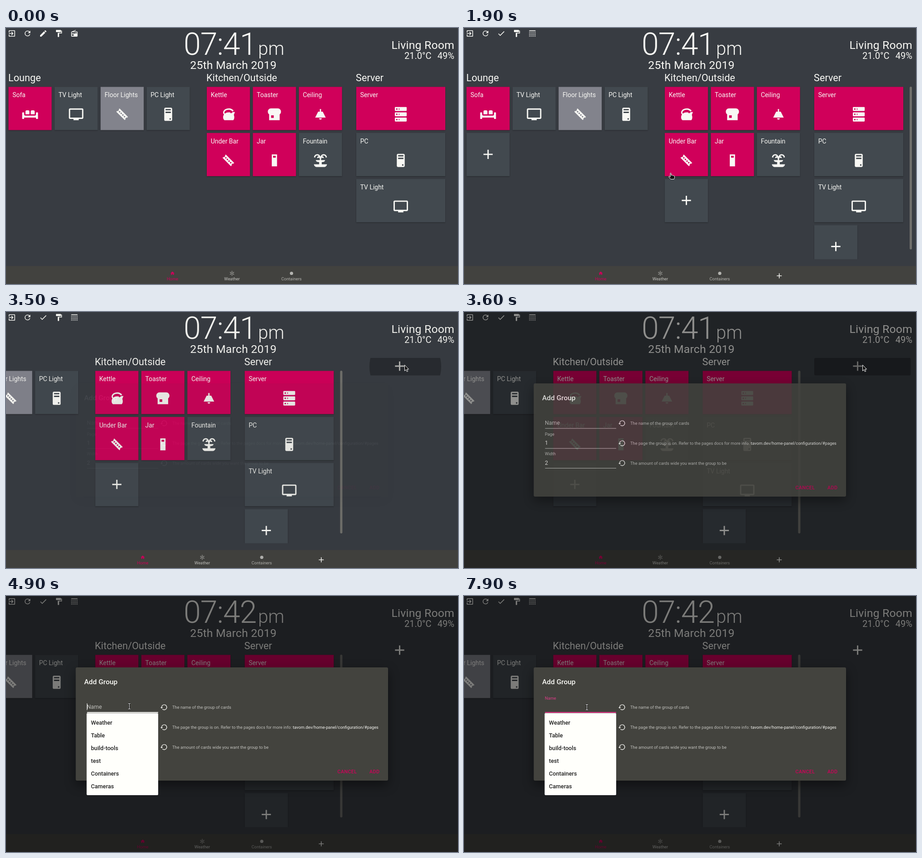
An HTML page that plays this animation: 995 px wide and 563 px high, repeating every 8000 ms.

```html
<!DOCTYPE html>
<html lang="en">
<head>
<meta charset="utf-8">
<title>Home panel</title>
<style>
  html, body { margin: 0; width: 100%; height: 100%; overflow: hidden; background: #383c42; }
  svg { display: block; width: 995px; height: 563px; font-family: Roboto, sans-serif; }
  text { white-space: pre; }
  .ui { fill: #f8f8f4; }
  .card { filter: drop-shadow(0 1px 1px rgba(0, 0, 0, .35)); }
  .plus { fill: none; stroke: #f8f8f4; stroke-width: 2; }
  .head { font-size: 21.7px; }
  .name { font-size: 13.95px; }
  .big { font-size: 24.8px; letter-spacing: .18px; }
  .tab { font-size: 9.3px; text-anchor: middle; }
  .help { font-size: 9.3px; fill: #c0c0bc; }
  .value { font-size: 12.4px; fill: #f0f0ec; }
  .button { font-size: 10.85px; font-weight: 500; letter-spacing: .3px; fill: #d0005a; }
  .option { font-size: 12.65px; font-weight: 500; fill: #222; }
  .pointer { fill: #111; stroke: #fff; stroke-width: 1; stroke-linejoin: round; }
</style>
</head>
<body>
<svg id="stage" viewBox="0 0 995 563"></svg>
<script>
const PINK = '#d0005a', SLATE = '#42494f', GREY = '#82838c';

const path = d => `<path fill-rule="evenodd" d="${d}"/>`;
const rows = f => [0, 8, 16].map(f).join('');
const PLUS = '<path class="plus" d="M12 5v14M5 12h14"/>';

const icons = {
  sofa: path('M7 6h2a2 2 0 0 1 2 2v4H5V8a2 2 0 0 1 2-2M15 6h2a2 2 0 0 1 2 2v4h-6V8a2 2 0 0 1 2-2M1 9h1a1 1 0 0 1 1 1v2a2 2 0 0 0 2 2h14a2 2 0 0 0 2-2v-2a1 1 0 0 1 1-1h1a1 1 0 0 1 1 1v9h-3v-2H3v2H0v-9a1 1 0 0 1 1-1z'),
  tv: path('M21 17H3V5h18zM21 3H3a2 2 0 0 0-2 2v12a2 2 0 0 0 2 2h5v2h8v-2h5a2 2 0 0 0 2-2V5a2 2 0 0 0-2-2z'),
  strip: `<g transform="rotate(45 12 12)">${path('M3 8.5h18v2h-1v3h1v2H3v-2h1v-3H3z' + [5.5, 9, 12.5, 16].map(x => `M${x} 11h2v2h-2z`).join(''))}</g>`,
  tower: path('M8 2h8a2 2 0 0 1 2 2v16a2 2 0 0 1-2 2H8a2 2 0 0 1-2-2V4a2 2 0 0 1 2-2M8 4v2h8V4zM8 8v2h8V8zM14 18v2h2v-2z'),
  kettle: path('M4 9.5C4 5.5 8 3 12.5 3c3.5 0 6.3 1.4 7.5 3.5L18.2 8c-1-1.8-3.2-3-5.7-3C9 5 6 7 6 9.5c0 .5.2 1 .6 1.5C8 9.7 10 9 12 9h2.5l1.5 1.5 3-2h3l-1.7 4.3c.5 1.2.7 2.4.7 3.7 0 2-.5 3.500-1.5 4.500H6c-1.300-1-2-2.700-2-4.500 0-1.600.5-3 1.400-4.200C4.500 11.400 4 10.400 4 9.500z'),
  toaster: path('M7 3h10c3 0 5 2.500 5 5 0 2-1 3.500-2 4v9H4v-9c-1-.5-2-2-2-4 0-2.500 2-5 5-5M7 13.500v4h4v-4z'),
  lamp: path('M11 4h2v4h2.500L20 17H4L8.500 8H11zM10 18h4a2 2 0 0 1-4 0z'),
  jar: path('M8 3h8v18H8zM10 5v3h4V5z'),
  fountain: '<path fill="none" stroke="#f8f8f4" stroke-width="2" d="M12 12V7M11.500 9C11 2 4 2 3 7.500M12.500 9C13 2 20 2 21 7.500M8 8.500C8 6.500 10 6 12 8c2-2 4-1.500 4 .5"/>' +
    path('M5 11.500h14c0 2.300-2.500 3-5 3V18h-4v-3.500c-2.500 0-5-.7-5-3zM2 18h20c-.5 2.500-2 4-4 4H6c-2 0-3.500-1.500-4-4z'),
  server: path(rows(y => `M4 ${y + 1}h16a1 1 0 0 1 1 1v4a1 1 0 0 1-1 1H4a1 1 0 0 1-1-1v-4a1 1 0 0 1 1-1M5 ${y + 3}v2h2v-2zM9 ${y + 3}v2h1v-2z`)),
  exit: path('M10.090 15.590L11.500 17l5-5-5-5-1.410 1.410L12.670 11H3v2h9.670zM19 3H5a2 2 0 0 0-2 2v4h2V5h14v14H5v-4H3v4a2 2 0 0 0 2 2h14a2 2 0 0 0 2-2V5a2 2 0 0 0-2-2z'),
  refresh: path('M17.650 6.350A7.960 7.960 0 0 0 12 4a8 8 0 1 0 7.730 10h-2.080A6 6 0 1 1 12 6c1.660 0 3.140.69 4.220 1.780L13 11h7V4z'),
  edit: path('M3 17.250V21h3.750L17.810 9.940l-3.750-3.750zM20.710 7.040a1 1 0 0 0 0-1.410l-2.340-2.340a1 1 0 0 0-1.410 0l-1.830 1.830 3.750 3.750z'),
  paint: path('M18 4V3a1 1 0 0 0-1-1H5a1 1 0 0 0-1 1v4a1 1 0 0 0 1 1h12a1 1 0 0 0 1-1V6h1v4H9v11a1 1 0 0 0 1 1h2a1 1 0 0 0 1-1v-9h8V4z'),
  radio: path('M3.240 6.150C2.510 6.430 2 7.170 2 8v12a2 2 0 0 0 2 2h16a2 2 0 0 0 2-2V8a2 2 0 0 0-2-2H8.300l8.260-3.340L15.880 1zM7 20a3 3 0 1 1 0-6 3 3 0 0 1 0 6zM20 12h-2v-2h-2v2H4V8h16z'),
  check: path('M9 16.170L4.830 12l-1.420 1.410L9 19 21 7l-1.410-1.410z'),
  dots: '<path fill="none" stroke="#f8f8f4" stroke-width="2" stroke-dasharray="2 2" d="M3 8h18M3 12h18M3 16h18M3 20h18"/>' + path('M3 3h18v2H3z'),
  home: path('M10 20v-6h4v6h5v-8h3L12 3 2 12h3v8z'),
  sun: '<circle cx="12" cy="12" r="4" fill="none" stroke="#c4c4c0" stroke-width="2"/><path fill="none" stroke="#c4c4c0" stroke-width="3" d="M12 1v4M12 19v4M2.500 6.500L6 8.500M18 15.500l3.500 2M2.500 17.500L6 15.500M18 8.500l3.500-2"/>',
  box: '<circle cx="12" cy="12" r="8"/>',
  reset: path('M13 3a9 9 0 0 0-9 9H1l3.900 3.900L9 12H6a7 7 0 1 1 7 7c-1.900 0-3.700-.8-4.900-2.100l-1.400 1.400A9 9 0 1 0 13 3z'),
  plus: PLUS
};

const icon = (name, x, y, scale) =>
  `<g transform="translate(${x} ${y}) scale(${scale}) translate(-12 -12)">${icons[name]}</g>`;
const text = (cls, x, y, content, extra = '') =>
  `<text class="${cls}" x="${x}" y="${y}" ${extra}>${content}</text>`;
const rect = (x, y, w, h, fill, extra = '') =>
  `<rect x="${x}" y="${y}" width="${w}" height="${h}" fill="${fill}" ${extra}/>`;

const cardX = (left, col) => left + col * 101.35;
const cardY = row => 129.5 + row * 101.35;

function card(left, col, row, label, symbol, fill = SLATE, width = 95) {
  const x = cardX(left, col), y = cardY(row);
  return rect(x, y, width, 95, fill, 'class="card"') +
    text('name', x + 8.7, y + 22.7, label) + icon(symbol, x + width / 2, y + 60.3, 1.45);
}
function addCard(left, row) {
  const y = cardY(row);
  return `<g class="editing">${rect(left, y, 95, 95, SLATE, 'class="card"')}${icon('plus', left + 47.5, y + 47, 1.45)}</g>`;
}

const groups =
  text('head', 5, 116.5, 'Lounge') +
  card(5.5, 0, 0, 'Sofa', 'sofa', PINK) + card(5.5, 1, 0, 'TV Light', 'tv') +
  card(5.5, 2, 0, 'Floor Lights', 'strip', GREY) + card(5.5, 3, 0, 'PC Light', 'tower') + addCard(5.5, 1) +
  text('head', 441, 116.5, 'Kitchen/Outside') +
  card(442, 0, 0, 'Kettle', 'kettle', PINK) + card(442, 1, 0, 'Toaster', 'toaster', PINK) +
  card(442, 2, 0, 'Ceiling', 'lamp', PINK) + card(442, 0, 1, 'Under Bar', 'strip', PINK) +
  card(442, 1, 1, 'Jar', 'jar', PINK) + card(442, 2, 1, 'Fountain', 'fountain') + addCard(442, 2) +
  text('head', 770, 116.5, 'Server') +
  card(771, 0, 0, 'Server', 'server', PINK, 196) + card(771, 0, 1, 'PC', 'tower', SLATE, 196) +
  card(771, 0, 2, 'TV Light', 'tv', SLATE, 196) + addCard(771, 3) +
  `<g class="editing">${rect(981, 129, 5, 358, '#70706c', 'rx="2.5"')}${icon('plus', 1112, 119, 1.45)}</g>`;

const tab = (x, symbol, label, color) =>
  `<g fill="${color}">${icon(symbol, x, 539.5, .45)}${text('tab', x, 554.5, label)}</g>`;

const field = (y, label, value, help) =>
  (label ? text('help', 178, y - 16.5, label) + text('value', 178, y + 4, value) : '') +
  rect(178.5, y + 11.5, 156.5, 1, '#c8c8c4') +
  `<g fill="#f0f0ec">${icon('reset', 347.5, y + .7, .7)}</g>` + text('help', 366, y + 4, help);

const dialog =
  rect(153.5, 157, 687.5, 249, '#43433e', 'rx="3" style="filter:drop-shadow(0 9px 12px rgba(0,0,0,.45))"') +
  text('ui', 172, 193.5, 'Add Group', 'font-size="15.5" font-weight="500"') +
  field(244, '', '', 'The name of the group of cards') +
  field(288, 'Page', '1', 'The page the group is on. Refer to the pages docs for more info: <tspan fill="#f4f4f0">tavom.dev/home-panel/configuration/#pages</tspan>') +
  field(331.5, 'Width', '2', 'The amount of cards wide you want the group to be') +
  rect(178.5, 255, 156.5, 2, '#e8e8e4', 'id="underline"') +
  '<text id="label" x="178">Name</text>' +
  text('button', 729.5, 389.5, 'CANCEL') + text('button', 800, 389.5, 'ADD');

const options = ['Weather', 'Table', 'build-tools', 'test', 'Containers', 'Cameras'];
const dropdown = rect(177.5, 257.5, 157.5, 180.5, '#fffffb', 'rx="2"') +
  options.map((o, i) => text('option', 187, 282.5 + i * 28, o)).join('');

stage.innerHTML = `
  <defs>
    <clipPath id="content"><rect y="95" width="995" height="413.5"/></clipPath>
    <clipPath id="addButton"><rect x="771" y="101" width="212.5" height="38.5" rx="3"/></clipPath>
  </defs>
  ${rect(0, 0, 995, 563, '#383c42')}
  <g class="ui">
    ${['exit', 'refresh', '', 'paint'].map((n, i) => n && icon(n, 13 + i * 34.4, 12, .775)).join('')}
    <g class="viewing">${icon('edit', 82, 12, .775)}${icon('radio', 150.5, 12, .7)}</g>
    <g class="editing">${icon('check', 82, 12, .775)}${icon('dots', 150.5, 12, .775)}</g>
    <text id="clock" x="391" y="58.5" font-size="68.2" font-weight="300" letter-spacing="-1.06"></text>
    ${text('', 555, 58.5, 'pm', 'font-size="40" font-weight="300"')}
    ${text('big', 500.5, 89.5, '25th March 2019', 'text-anchor="middle"')}
    ${text('big', 987, 46, 'Living Room', 'text-anchor="end"')}
    ${text('', 936.5, 68, '21.0°C', 'font-size="20" text-anchor="end"')}
    ${text('', 987, 68, '49%', 'font-size="20" text-anchor="end"')}
    <g clip-path="url(#content)"><g id="groups">${groups}</g></g>
  </g>
  <g clip-path="url(#addButton)"><circle id="ripple" cx="879" cy="120"/></g>
  ${rect(0, 523.5, 995, 39.5, '#42423f')}
  <g id="tabs">
    ${tab(366.5, 'home', 'Home', PINK)}${tab(497.5, 'sun', 'Weather', '#c4c4c0')}${tab(628.5, 'box', 'Containers', '#b4b4b0')}
    <g class="editing">${icon('plus', 759.5, 545, .775)}</g>
  </g>
  <rect id="backdrop" width="995" height="563"/>
  <g id="dialog">${dialog}</g>
  <g id="dropdown">${dropdown}</g>
  ${rect(178, 236, 1, 15, '#fff', 'id="caret"')}
  <g id="cursor">
    <path id="arrow" class="pointer" d="M.5.500V13.500L3.500 10.700 5.500 15.200 7.700 14.200 5.700 9.800H9.500z"/>
    <path id="hand" class="pointer" d="M-1 .8C-1-.4 1-.4 1 .8V5C3 4.300 4 4.500 4.500 5.500 6 5 6.800 5.500 7 6.300 8.300 6 8.500 7 8.500 8V10.500L7.200 13.500H0L-4.300 8.500C-4.800 7.500-3.500 6.500-2.500 7.500L-1 9z"/>
    <g id="beam" fill="none"><path id="beamShape" d="M-2.500-6H-1Q0-6 0-5Q0-6 1-6H2.500M0-5V5M-2.500 6H-1Q0 6 0 5Q0 6 1 6H2.500" stroke="#111" stroke-width="3"/><use href="#beamShape" style="display:none"/><path d="M-2.500-6H2.500M0-6V6M-2.500 6H2.500" stroke="#fff"/></g>
  </g>`;

const $ = id => document.getElementById(id);
const show = (el, on) => { el.style.display = on ? '' : 'none'; };
const showAll = (cls, on) => document.querySelectorAll(cls).forEach(el => show(el, on));

// Linear interpolation over [time, ...values] keys.
function at(keys, t) {
  const i = keys.findIndex(k => k[0] > t);
  if (i === 0) return keys[0].slice(1);
  if (i < 0) return keys[keys.length - 1].slice(1);
  const a = keys[i - 1], b = keys[i], p = (t - a[0]) / (b[0] - a[0]);
  return a.slice(1).map((v, n) => v + (b[n + 1] - v) * p);
}

const cursorKeys = [
  [400, 130, 44], [700, 82, 12], [900, 82, 12], [1200, 152, 11], [1500, 363, 219], [1800, 363, 219],
  [1900, 455, 319], [2500, 455, 319], [2600, 583, 258], [2700, 583, 258], [3100, 886, 119], [3300, 886, 119],
  [3400, 877, 116], [3600, 877, 116], [4100, 760, 165], [4200, 760, 165],
  [4800, 271.5, 242.5], [4900, 271.5, 242.5], [5100, 270.5, 244.5]
];
const scrollKeys = [[1900, 0], [2000, 130], [2100, 245.5]];
const openKeys = [[3400, 0], [3500, .06], [3600, .85], [3700, 1]];
const rippleKeys = [[3300, 0, .28], [3400, 40, .28], [3500, 79, .28], [3600, 112, .28], [3700, 112, .28], [4100, 112, 0]];
const labelKeys = [[4900, 0], [5100, 1]];
const blinks = [4900, 5600, 6100, 6700, 7500, 7900];

function render(t) {
  const editing = t >= 900, focused = t >= 4900;
  showAll('.editing', editing);
  showAll('.viewing', !editing);
  $('clock').textContent = t < 4600 ? '07:41' : '07:42';
  $('groups').setAttribute('transform', `translate(${-at(scrollKeys, t)[0]} 0)`);
  $('tabs').setAttribute('transform', `translate(${editing ? -65.5 : 0} 0)`);

  const [radius, shade] = at(rippleKeys, t);
  $('ripple').setAttribute('r', radius);
  $('ripple').setAttribute('opacity', shade);

  const [open] = at(openKeys, t);
  $('backdrop').setAttribute('opacity', open / 2);
  $('dialog').setAttribute('opacity', open);

  const [lift] = at(labelKeys, t), label = $('label');
  label.setAttribute('y', 248 - lift * 20.5);
  label.setAttribute('font-size', 12.4 - lift * 3.1);
  label.setAttribute('fill', lift > 0 ? '#dc3c88' : '#c0c0bc');
  show($('underline'), t >= 4800);
  $('underline').setAttribute('fill', lift > 0 ? '#d82c7c' : '#e8e8e4');
  show($('dropdown'), focused);
  show($('caret'), blinks.filter(b => b <= t).length % 2);

  const [x, y] = at(cursorKeys, t);
  $('cursor').setAttribute('transform', `translate(${x} ${y})`);
  show($('cursor'), t >= 400);
  const shape = t >= 4700 ? 'beam' : t >= 1500 && t < 3400 ? 'hand' : 'arrow';
  for (const s of ['arrow', 'hand', 'beam']) show($(s), s === shape);
}

// The screen updates ten times a second.
const start = performance.now();
function tick(now) {
  render(Math.floor(Math.max(0, now - start) % 8000 / 100) * 100);
  requestAnimationFrame(tick);
}
render(0);
requestAnimationFrame(tick);
</script>
</body>
</html>
```
